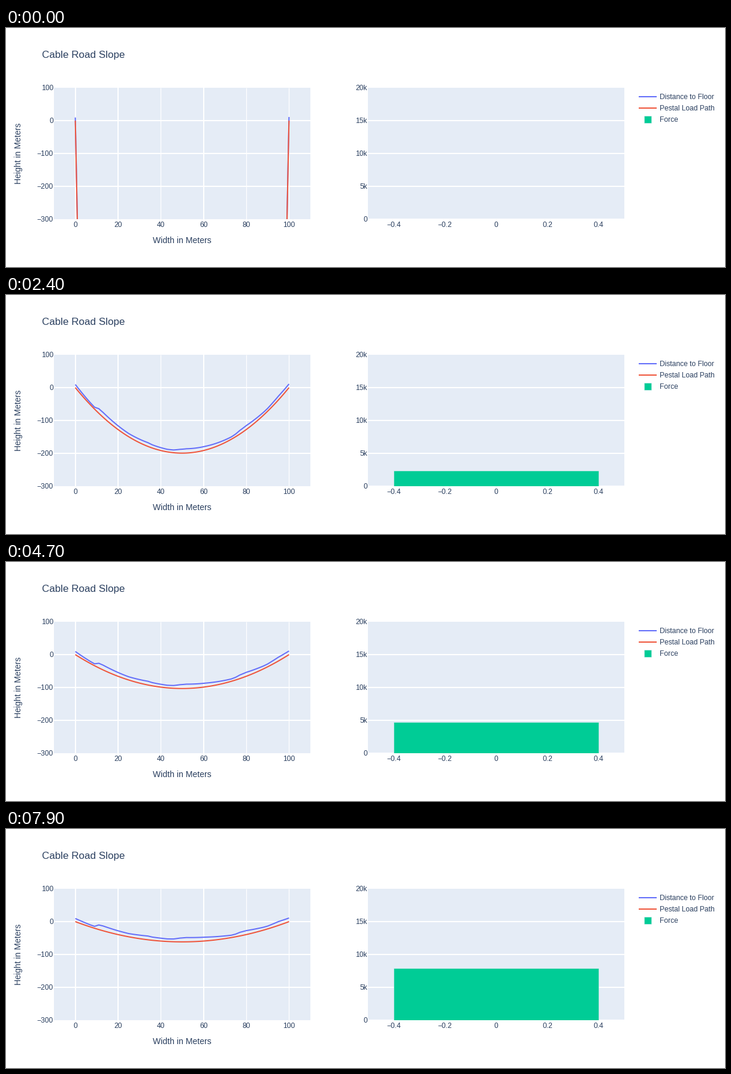
These frames come from a looping animation (1200 by 400 pixels, 8 s). A matplotlib script:

```python
import numpy as np
import matplotlib as mpl
import matplotlib.pyplot as plt
from matplotlib.animation import FuncAnimation
from matplotlib.patches import Rectangle

W, H, DPI = 1200, 400, 100
FRAMES, STEP_MS = 80, 100
PT = 72 / DPI  # points per pixel

INK, PANEL = "#2a3f5f", "#E5ECF6"
BLUE, RED, GREEN = "#636EFA", "#EF553B", "#00CC96"

TOP, BOTTOM = 100, 320
LEFT, RIGHT, WIDTH = 80, 604, 428

LOAD = 490500      # midspan moment of the load
BASE_FORCE = 60    # tension left in the slack cable

mpl.rcParams["font.family"] = "Liberation Sans"
mpl.rcParams["axes.unicode_minus"] = True

fig = plt.figure(figsize=(W / DPI, H / DPI), dpi=DPI, facecolor="white")
ax = fig.add_axes([0, 0, 1, 1])
ax.set_xlim(0, W)
ax.set_ylim(H, 0)
ax.axis("off")


def road_x(v):
    return LEFT + (v + 10) * WIDTH / 120


def road_y(v):
    return TOP + (100 - v) * 0.55


def force_x(v):
    return RIGHT + (v + 0.5) * WIDTH


def force_y(v):
    return BOTTOM - v * 0.011


def label(x, y, text, size=12, ha="left", **kw):
    ax.text(x, y, text, fontsize=size * PT, color=INK, ha=ha,
            va="baseline", **kw)


def stroke(xs, ys, color, width, z=2):
    line, = ax.plot(xs, ys, color=color, lw=width * PT, zorder=z,
                    solid_capstyle="butt", solid_joinstyle="round")
    return line


def panel(x):
    rect = Rectangle((x, TOP), WIDTH, BOTTOM - TOP, fc=PANEL, lw=0, zorder=0)
    return ax.add_patch(rect)


def signed(v, form="{:g}"):
    return form.format(v).replace("-", "\u2212")


road, chart = panel(LEFT), panel(RIGHT)

# left axes
for v in range(0, 101, 20):
    x = road_x(v)
    stroke([x, x], [TOP, BOTTOM], "white", 2 if v in (0, 20, 60) else 1.3, 1)
    label(x, 333, signed(v), ha="center")
for v in range(-300, 101, 100):
    y = road_y(v)
    if TOP < y < BOTTOM:
        stroke([LEFT, LEFT + WIDTH], [y, y], "white", 2, 1)
    label(79, y + 4, signed(v), ha="right")

# right axes
for v in np.arange(-0.4, 0.5, 0.2):
    label(force_x(v), 333, signed(round(v, 1) + 0.0), ha="center")
for k in range(0, 21, 5):
    y = force_y(k * 1000)
    if y > TOP:
        stroke([RIGHT, RIGHT + WIDTH], [y, y], "white", 2, 1)
    label(603, y + 4, f"{k}k" if k else "0", ha="right")

label(60, 50, "Cable Road Slope", 17)
label(294, 360, "Width in Meters", 14, "center")
ax.text(28, 210, "Height in Meters", fontsize=14 * PT, color=INK,
        rotation=90, ha="right", va="center")

# legend
stroke([1056, 1086], [114.5, 114.5], BLUE, 2)
stroke([1056, 1086], [133.5, 133.5], RED, 2)
ax.add_patch(Rectangle((1065, 146.5), 12, 12, fc=GREEN, ec=PANEL,
                       lw=0.5 * PT))
for i, name in enumerate(("Distance to Floor", "Pestal Load Path", "Force")):
    label(1091, 119 + 19 * i, name)

# clearance between the load path and the ground, in meters
KNOT_X = [0, 7, 9, 11, 13, 20, 25, 34, 36, 41, 43, 46, 49, 52, 61,
          73, 75, 77, 80, 88, 90, 95, 100]
KNOT_H = [9.5, 6.2, 5.8, 14, 14.6, 11.5, 9.8, 11.4, 9.8, 8.5, 7.8, 8.4, 11.5,
          13, 11.4, 7.2, 8.2, 11, 12, 8.8, 8.6, 11.6, 11]
span = np.arange(101)
clearance = np.interp(span, KNOT_X, KNOT_H)

floor = stroke([], [], BLUE, 2, 3)
path = stroke([], [], RED, 2, 4)
for line in (floor, path):
    line.set_clip_path(road)
bar = ax.add_patch(Rectangle((force_x(-0.4), BOTTOM), 0.8 * WIDTH, 0, fc=GREEN,
                             ec=PANEL, lw=0.5 * PT, zorder=3))
bar.set_clip_path(chart)


def draw(i):
    force = 100 * i
    sag = LOAD / (force + BASE_FORCE)
    load = -4 * sag * span * (100 - span) / 100 ** 2
    path.set_data(road_x(span), road_y(load))
    floor.set_data(road_x(span), road_y(load + clearance))
    bar.set_y(force_y(force))
    bar.set_height(force * 0.011)
    bar.set_visible(force > 0)
    return floor, path, bar


anim = FuncAnimation(fig, draw, frames=FRAMES, interval=STEP_MS, repeat=True,
                     repeat_delay=0, init_func=lambda: draw(0))
plt.show()
```
